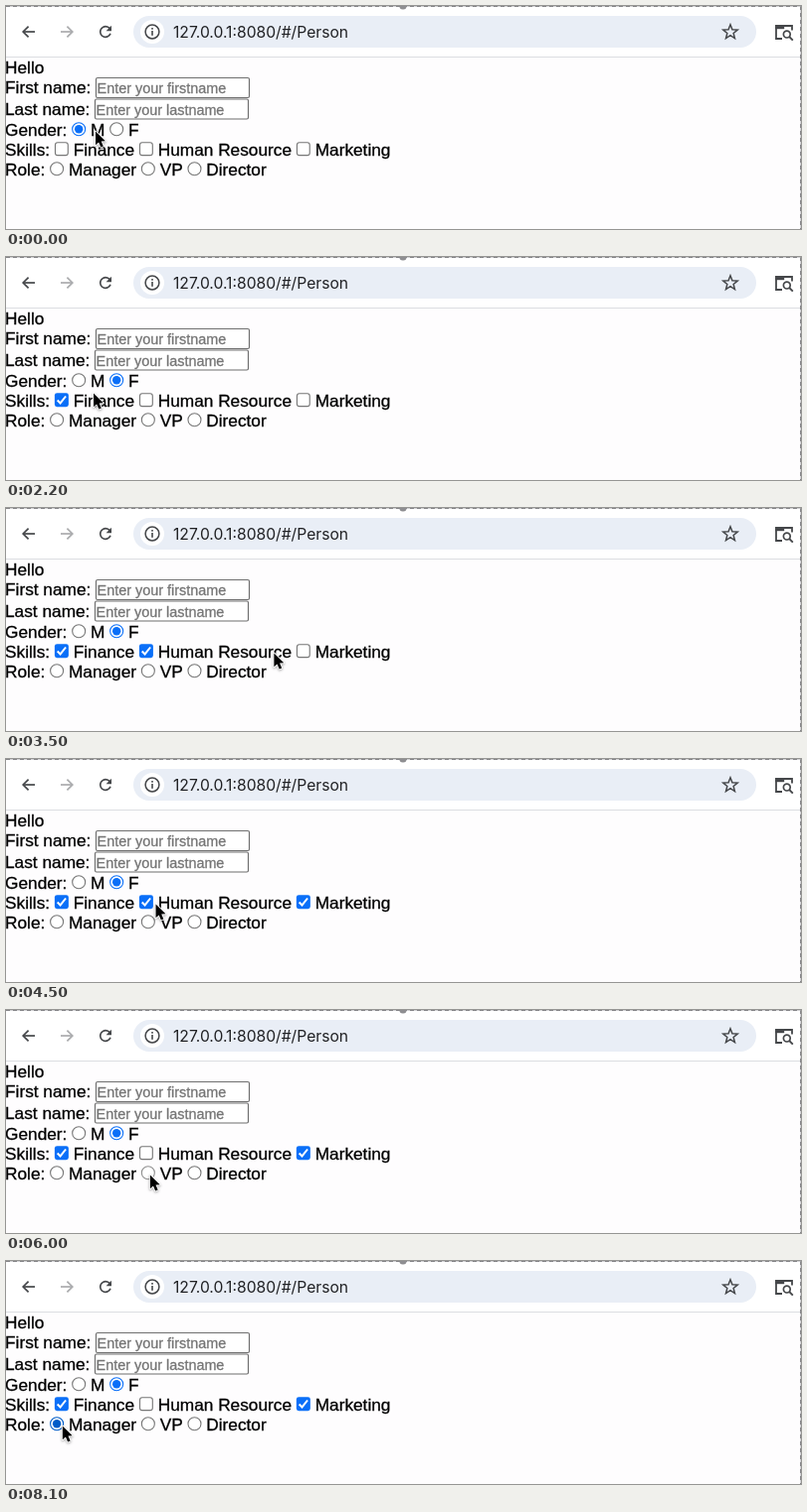
These frames come from a looping animation (799 px wide and 225 px high, 8900 ms). An HTML page with a canvas:

```html
<!DOCTYPE html>
<html lang="en">
<head>
<meta charset="utf-8">
<title>Person form</title>
<style>
html, body { margin: 0; width: 100%; height: 100%; overflow: hidden; background: #fff; }
canvas { display: block; width: 799px; height: 225px; }
</style>
</head>
<body>
<canvas id="stage" width="799" height="225"></canvas>
<script>
const ctx = document.getElementById('stage').getContext('2d');
const W = 799, H = 225, LOOP = 8900, STEP = 100;
const SANS = '"Liberation Sans", Arial, sans-serif';
const UI = 'Inter, Roboto, sans-serif';
const SIZE = 17.28, LEFT = -1, BOX = 14;
const INK = '#45474a';

const ROWS = [
  { name: 'Gender:', y: 124.5, options: ['M', 'F'] },
  { name: 'Skills:', y: 144.5, options: ['Finance', 'Human Resource', 'Marketing'], many: true },
  { name: 'Role:', y: 164.5, options: ['Manager', 'VP', 'Director'] }
];

// Pointer visits: dx is where it rests in the control, via lists detours on the way
const VISITS = [
  { label: 'F', dx: 1, arrive: 200, press: 600, leave: 900 },
  { label: 'Finance', dx: 1, arrive: 1500, press: 1700, leave: 1800 },
  { label: 'Human Resource', dx: 1, arrive: 2900, press: 3000, leave: 3100,
    via: [[2000, 122, 122], [2400, 54, 153]] },
  { label: 'Marketing', dx: -1, arrive: 3650, press: 3800, leave: 3900 },
  { label: 'Human Resource', dx: 1, arrive: 4600, press: 4900, leave: 5000 },
  { label: 'VP', dx: 2, arrive: 5700, press: 6000, leave: 6200, via: [[5400, 290, 175]] },
  { label: 'Director', dx: 2, arrive: 6500, press: 6700, leave: 6800 },
  { label: 'Manager', dx: 5.7, arrive: 7600, press: 8000, leave: LOOP, via: [[7300, 63, 168]] }
];

// Lay controls and labels out inline, one space apart
function layout() {
  ctx.font = `${SIZE}px ${SANS}`;
  const width = s => ctx.measureText(s).width, gap = width(' ');
  return ROWS.flatMap(row => {
    let x = LEFT + width(row.name);
    return row.options.map(label => {
      const left = x + gap, tx = left + BOX + gap;
      x = tx + width(label);
      return { label, row, tx, x: left + BOX / 2, y: row.y };
    });
  });
}

const controls = layout();
const find = label => controls.find(c => c.label === label);

const path = [[0, 90, 126.5]];
for (const { label, dx, arrive, leave, via = [] } of VISITS) {
  const c = find(label), x = c.x + dx, y = c.y + 2;
  path.push(...via, [arrive, x, y], [leave, x, y]);
}

function pointerAt(t) {
  const i = path.findIndex(p => p[0] > t);
  const [t0, x0, y0] = path[i - 1], [t1, x1, y1] = path[i];
  const k = (t - t0) / (t1 - t0), e = k * k * (3 - 2 * k);
  return { x: x0 + (x1 - x0) * e, y: y0 + (y1 - y0) * e };
}

// A press shows first, the value changes on release
function stateAt(t) {
  const chosen = new Set(['M']);
  let pressed = null;
  for (const { label, press } of VISITS) {
    if (t >= press && t < press + STEP) pressed = label;
    if (t < press + STEP) break;
    const { row } = find(label);
    if (row.many && chosen.delete(label)) continue;
    if (!row.many) row.options.forEach(o => chosen.delete(o));
    chosen.add(label);
  }
  return { chosen, pressed };
}

function paint(fill, stroke, width = 1.1) {
  if (fill) { ctx.fillStyle = fill; ctx.fill(); }
  if (stroke) { ctx.strokeStyle = stroke; ctx.lineWidth = width; ctx.stroke(); }
}

function trace(points, close) {
  ctx.beginPath();
  points.forEach(([x, y]) => ctx.lineTo(x, y));
  if (close) ctx.closePath();
}

function line(points, color, width, close) {
  trace(points, close);
  paint(null, color, width);
}

function circle(x, y, r, fill, stroke, width) {
  ctx.beginPath();
  ctx.arc(x, y, r, 0, Math.PI * 2);
  paint(fill, stroke, width);
}

function box(x, y, w, h, r, fill, stroke, width) {
  ctx.beginPath();
  ctx.roundRect(x, y, w, h, r);
  paint(fill, stroke, width);
}

function rect(x, y, w, h, color) {
  ctx.fillStyle = color;
  ctx.fillRect(x, y, w, h);
}

// A hairline stroke gives the page text its slightly heavy look
function text(s, x, y, size = SIZE, color = '#000') {
  ctx.font = `${size}px ${SANS}`;
  ctx.fillStyle = ctx.strokeStyle = color;
  ctx.lineWidth = 0.3;
  ctx.fillText(s, x, y);
  ctx.strokeText(s, x, y);
}

function arrow(x, dir, color) {
  const y = 26, head = 5.4;
  line([[x - 6 * dir, y], [x + 6 * dir, y]], color, 1.7);
  line([[x + 0.4 * dir, y - head], [x + 5.8 * dir, y], [x + 0.4 * dir, y + head]], color, 1.7);
}

function drawReload() {
  ctx.beginPath();
  ctx.arc(100, 26, 5.3, 0.35, Math.PI * 1.78);
  paint(null, INK, 1.7);
  trace([[106, 19.8], [106, 25.2], [100.6, 25.2]], true);
  paint(INK);
}

function drawAddress() {
  box(128, 10, 626, 32, 16, '#e9eef6');
  circle(147, 26, 12, '#fff');
  circle(147, 26, 6.9, null, INK, 1.5);
  rect(146.2, 25, 1.6, 4.8, INK);
  rect(146.2, 22, 1.6, 1.7, INK);
  ctx.font = `15.65px ${UI}`;
  ctx.fillStyle = '#202124';
  ctx.fillText('127.0.0.1:8080/#/Person', 168, 31.6);

  const star = Array.from({ length: 10 }, (_, i) => {
    const a = i * Math.PI / 5 - Math.PI / 2, r = i % 2 ? 3.3 : 7.6;
    return [728 + r * Math.cos(a), 26.4 + r * Math.sin(a)];
  });
  line(star, INK, 1.5, true);
}

function drawTabSearch() {
  line([[780, 33], [774, 33], [774, 20], [790, 20], [790, 24.5]], INK, 1.8);
  rect(773.2, 19.2, 9, 4, INK);
  circle(784.8, 28.6, 3.4, null, INK, 1.7);
  line([[787.2, 31], [790.8, 34.6]], INK, 1.8);
}

function drawToolbar() {
  rect(0, 0, W, 51, '#fff');
  arrow(23, -1, INK);
  arrow(61, 1, '#aaabad');
  drawReload();
  drawAddress();
  drawTabSearch();
  rect(0, 51, W, 1, '#dcdde1');
}

function drawSelectionEdge() {
  const edge = [[0, 0.5], [W - 0.5, 0.5], [W - 0.5, H]];
  line(edge, '#d4d4d6', 1);
  ctx.setLineDash([4, 3]);
  line(edge, '#88888b', 1);
  ctx.setLineDash([]);
  circle(399, 0, 3.6, '#8e8e91');
}

function drawField(name, x, baseline, hint) {
  text(name, LEFT, baseline);
  box(x + 0.5, baseline - 15.5, 154, 20, 1.5, '#fff', '#6f6f6f', 1.2);
  text(hint, x + 1.6, baseline, 14.4, '#757575');
}

function shade(on, hot, pressed) {
  if (pressed) return on ? '#3793ff' : '#8f8f8f';
  if (hot) return on ? '#005cc8' : '#4f4f4f';
  return on ? '#0a6ff8' : '#767676';
}

function drawControl(c, { chosen, pressed }, tip) {
  const { x, y, row } = c, on = chosen.has(c.label);
  const hot = Math.hypot(tip.x - x, tip.y - y) < BOX / 2;
  const color = shade(on, hot, pressed === c.label);

  if (row.many) {
    const s = on ? 7 : 6.4;
    box(x - s, y - s - 0.3, 2 * s, 2 * s, 2.4, on ? color : '#fff', on ? null : color);
    if (on) line([[x - 4.2, y], [x - 1.3, y + 2.9], [x + 4.2, y - 4]], '#fff', 2);
  } else {
    circle(x, y - 0.2, 6.5, '#fff', color);
    if (on) circle(x, y - 0.2, 4.2, color);
  }
  text(c.label, c.tx, y + 6.5);
}

function drawPointer({ x, y }) {
  const shape = [[0, 0], [0, 15.4], [3.5, 12.1], [5.9, 17.8], [8.7, 16.6], [6.3, 11.1], [11, 10.9]];
  ctx.save();
  ctx.translate(x, y);
  ctx.scale(0.9, 0.9);
  ctx.lineJoin = 'round';
  ctx.shadowColor = 'rgba(0,0,0,.35)';
  ctx.shadowBlur = 2.5;
  ctx.shadowOffsetY = 1;
  line(shape, '#fff', 2, true);
  ctx.shadowColor = 'transparent';
  paint('#000');
  ctx.restore();
}

function draw(t) {
  const state = stateAt(t), tip = pointerAt(t);
  rect(0, 0, W, H, '#fefdfe');
  drawToolbar();
  drawSelectionEdge();
  text('Hello', LEFT, 68);
  drawField('First name:', 90, 88, 'Enter your firstname');
  drawField('Last name:', 89, 109.5, 'Enter your lastname');
  ROWS.forEach(row => text(row.name, LEFT, row.y + 6.5));
  controls.forEach(c => drawControl(c, state, tip));
  drawPointer(tip);
}

function tick() {
  const t = performance.now() % LOOP;
  draw(Math.floor(t / STEP) * STEP);
  requestAnimationFrame(tick);
}
tick();
</script>
</body>
</html>
```
